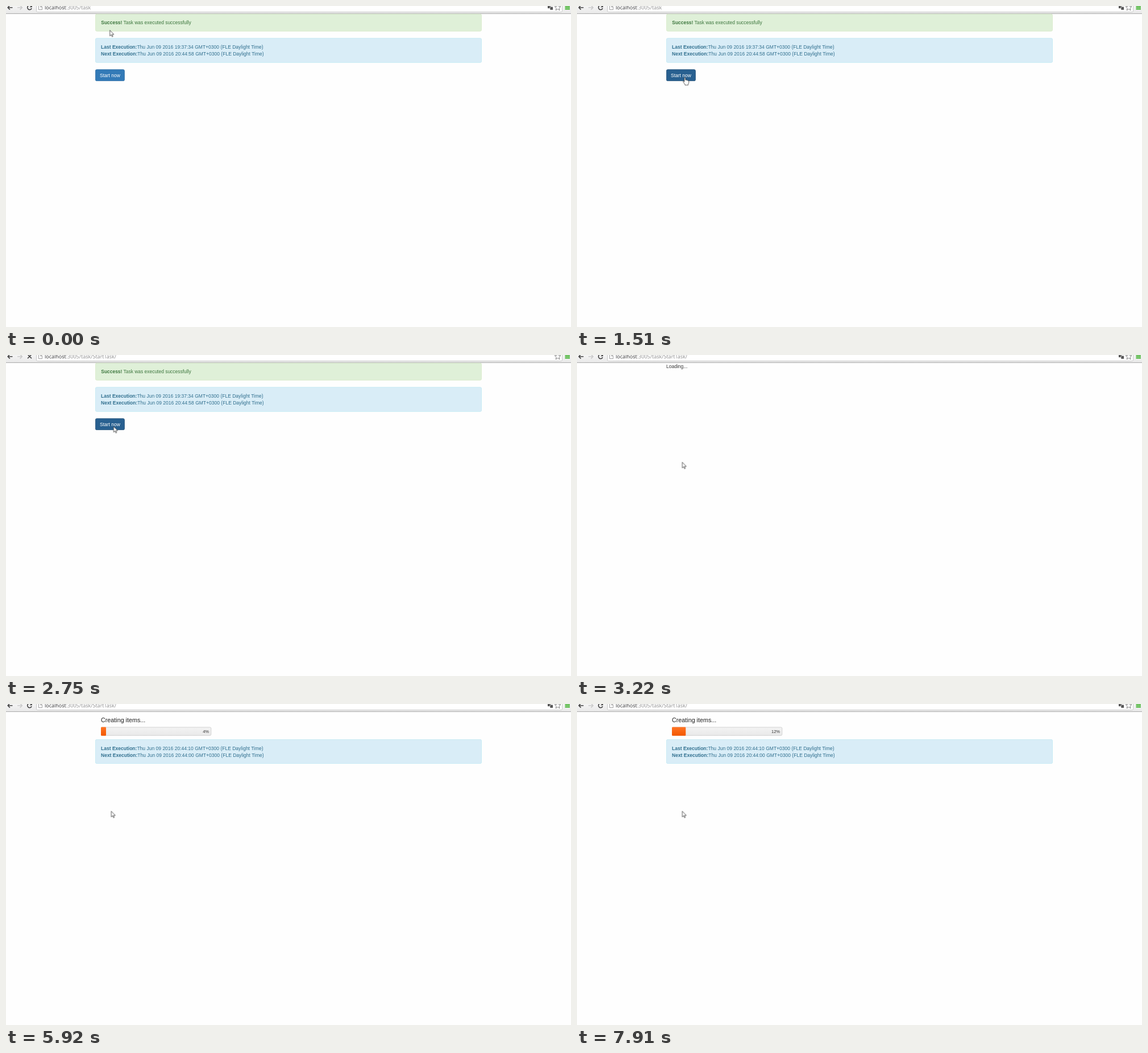
An HTML page that plays this animation: 994 px wide and 564 px high, repeating every 8000 ms.

```html
<!DOCTYPE html>
<html lang="en">
<head>
<meta charset="utf-8">
<title>Task runner</title>
<style>
html, body { margin: 0; width: 100%; height: 100%; overflow: hidden; background: #fefefe; }
svg { display: block; width: 994px; height: 564px; }
text { font: 8.53px "Liberation Sans", Arial, sans-serif; white-space: pre; }
.b { font-weight: bold; }
.url { font: 9px "Open Sans", sans-serif; fill: #8c8c8c; }
.url tspan { fill: #333; }
.ok { font-size: 8.45px; fill: #3c763d; }
.info { fill: #31708f; }
.title { font-size: 10.75px; fill: #222; }
.pct { font-size: 7.5px; fill: #333; text-anchor: end; }

/* Everything changes in hard steps on one shared 8 s clock. */
.t { animation: 8s step-end infinite; }

.first { animation-name: first; }
.loading { animation-name: loading; }
.running { animation-name: running; }
@keyframes first { 0% { opacity: 1 } 40.25% { opacity: 0 } }
@keyframes loading { 0% { opacity: 0 } 40.25% { opacity: 1 } 53% { opacity: 0 } }
@keyframes running { 0% { opacity: 0 } 53% { opacity: 1 } }

.before { animation-name: before; }
.after { animation-name: after; }
.idle { animation-name: idle; }
.busy { animation-name: busy; }
@keyframes before { 0% { opacity: 1 } 34.375% { opacity: 0 } }
@keyframes after { 0% { opacity: 0 } 34.375% { opacity: 1 } }
@keyframes idle { 0% { opacity: 1 } 34.375% { opacity: 0 } 40.25% { opacity: 1 } }
@keyframes busy { 0% { opacity: 0 } 34.375% { opacity: 1 } 40.25% { opacity: 0 } }

.button { animation-name: button; }
@keyframes button {
  0% { fill: #337ab7; stroke: #2e6da4 }
  17% { fill: #286090; stroke: #204d74 }
  32.5% { fill: #204d74; stroke: #1b4668 }
  34.375% { fill: #286090; stroke: #204d74 }
}

.bar { animation-name: bar; }
@keyframes bar {
  0% { width: 0 }
  65.375% { width: 1px }
  67.25% { width: 2px }
  69.125% { width: 4px }
  70.625% { width: 7px }
  72.125% { width: 9px }
  79.75% { width: 11px }
  81.25% { width: 13px }
  83.125% { width: 16px }
  84.625% { width: 17px }
  92% { width: 19px }
  93.5% { width: 21px }
  95.375% { width: 23px }
  97% { width: 24.3px }
}
.p0 { animation-name: p0; }
.p4 { animation-name: p4; }
.p8 { animation-name: p8; }
.p12 { animation-name: p12; }
@keyframes p0 { 0% { opacity: 1 } 74% { opacity: 0 } }
@keyframes p4 { 0% { opacity: 0 } 74% { opacity: 1 } 84.625% { opacity: 0 } }
@keyframes p8 { 0% { opacity: 0 } 84.625% { opacity: 1 } 98.875% { opacity: 0 } }
@keyframes p12 { 0% { opacity: 0 } 98.875% { opacity: 1 } }

.cursor { animation-name: cursor; }
@keyframes cursor {
  0% { transform: translate(182.7px, 42.5px) }
  1.875% { transform: translate(203px, 38px) }
  3.375% { transform: translate(228.5px, 29.5px) }
  5.25% { transform: translate(326.5px, 30px) }
  6.75% { transform: translate(169.5px, 75px) }
  8.25% { transform: translate(304.5px, 82px) }
  9.75% { transform: translate(304.5px, 96.5px) }
  11.625% { transform: translate(304.5px, 119.8px) }
  15.125% { transform: translate(282.5px, 124.5px) }
  17% { transform: translate(190px, 125.5px) }
  18.875% { transform: translate(189.3px, 125.5px) }
  36.375% { transform: translate(189px, 161.5px) }
  38.25% { transform: translate(185.2px, 188.3px) }
}
.arrow { animation-name: arrow; }
.beam { animation-name: beam; }
.hand { animation-name: hand; }
@keyframes arrow {
  0% { opacity: 1 } 3.375% { opacity: 0 } 9.75% { opacity: 1 } 17% { opacity: 0 }
  32.5% { opacity: 1 } 36.375% { opacity: 0 } 40.25% { opacity: 1 }
}
@keyframes beam { 0% { opacity: 0 } 3.375% { opacity: 1 } 9.75% { opacity: 0 } }
@keyframes hand {
  0% { opacity: 0 } 17% { opacity: 1 } 32.5% { opacity: 0 }
  36.375% { opacity: 1 } 40.25% { opacity: 0 }
}
</style>
</head>
<body>
<svg viewBox="0 0 994 564">
  <defs>
    <linearGradient id="chrome" x2="0" y2="1">
      <stop stop-color="#f4f4f4"/><stop offset="1" stop-color="#e9e9e9"/>
    </linearGradient>
    <linearGradient id="track" x2="0" y2="1">
      <stop stop-color="#f3f3f3"/><stop offset="1" stop-color="#e9e9e9"/>
    </linearGradient>
    <linearGradient id="fill" x2="0" y2="1">
      <stop stop-color="#ff7527"/><stop offset="1" stop-color="#f35800"/>
    </linearGradient>
  </defs>
  <rect width="994" height="564" fill="#fefefe"/>

  <!-- Browser toolbar -->
  <rect width="994" height="13" fill="url(#chrome)"/>
  <path d="M0 13.4H994" stroke="#a6a6a6"/>
  <path d="M53.5-2V8.5Q53.5 10.5 55.5 10.5H976.5Q978.5 10.5 978.5 8.5V-2" fill="#fff" stroke="#c9c9c9"/>
  <g fill="none" stroke-width="1.6">
    <path d="M11.5 2.7H3.5M6.8-1L3.2 2.7L6.8 6.4" stroke="#444"/>
    <path d="M20 2.7H28M24.7-1L28.3 2.7L24.7 6.4" stroke="#cbcbcb"/>
    <g class="t idle" stroke="#444">
      <path d="M44.4.2A3.8 3.8 0 1 0 45.1 3.9"/>
      <path d="M45.8-2V2.2H41.6Z" fill="#444" stroke="none"/>
    </g>
    <path class="t busy" d="M38-1L45 6M45-1L38 6" stroke="#444"/>
    <path d="M57.5-1V6.5H63.5V1.5L61-1M60.5-1V1.5H63.5" stroke="#8a8a8a" stroke-width=".8"/>
    <path d="M970.6-3.5L972.2.7L976 1L973 3.7L974 7.6L970.6 5.4L967.2 7.6L968.2 3.7L965.2 1L969 .7Z" fill="#fff" stroke="#777" stroke-width=".9"/>
    <path d="M983.5.4H992M983.5 3H992M983.5 5.6H992" stroke="#27a811" stroke-width="1.5"/>
  </g>
  <g class="t idle">
    <rect x="953" y="-2" width="5.5" height="6" fill="#555"/>
    <rect x="957" y="1.2" width="5.3" height="5.8" fill="#555" stroke="#fff" stroke-width=".6"/>
  </g>
  <text class="url t before" x="68" y="6.2"><tspan>localhost</tspan>:3005/task</text>
  <text class="url t after" x="68" y="6.2"><tspan>localhost</tspan>:3005/task/StartTask/</text>

  <!-- Finished task -->
  <g class="t first">
    <rect x="157.4" y="14.2" width="679.2" height="30" rx="2.4" fill="#dff0d8" stroke="#d6e9c6" stroke-width=".8"/>
    <text class="ok" x="167.3" y="32.3"><tspan class="b">Success!</tspan> Task was executed successfully</text>
    <rect x="157.4" y="56.7" width="679.2" height="42.6" rx="2.4" fill="#d9edf7" stroke="#bce8f1" stroke-width=".8"/>
    <text class="info" x="167" y="75.2"><tspan class="b">Last Execution:</tspan>Thu Jun 09 2016 19:37:34 GMT+0300 (FLE Daylight Time)</text>
    <text class="info" x="167" y="87.2"><tspan class="b">Next Execution:</tspan>Thu Jun 09 2016 20:44:58 GMT+0300 (FLE Daylight Time)</text>
    <rect class="t button" x="157.4" y="111.7" width="51" height="19.9" rx="2.2" stroke-width=".8"/>
    <text x="165" y="124.9" fill="#fff">Start now</text>
  </g>

  <text class="t loading" x="157" y="22.9" fill="#333">Loading...</text>

  <!-- Running task -->
  <g class="t running">
    <text class="title" x="167" y="32.2">Creating items...</text>
    <rect x="167.4" y="40.9" width="193.4" height="14.4" rx="2" fill="url(#track)" stroke="#cacaca" stroke-width=".8"/>
    <rect class="t bar" x="167" y="40.5" width="0" height="15.2" rx="1.3" fill="url(#fill)"/>
    <text class="pct t p0" x="357" y="50.9">0%</text>
    <text class="pct t p4" x="357" y="50.9">4%</text>
    <text class="pct t p8" x="357" y="50.9">8%</text>
    <text class="pct t p12" x="357" y="50.9">12%</text>
    <rect x="157.4" y="62.4" width="679.2" height="42.2" rx="2.4" fill="#d9edf7" stroke="#bce8f1" stroke-width=".8"/>
    <text class="info" x="167" y="80.6"><tspan class="b">Last Execution:</tspan>Thu Jun 09 2016 20:44:10 GMT+0300 (FLE Daylight Time)</text>
    <text class="info" x="167" y="92.6"><tspan class="b">Next Execution:</tspan>Thu Jun 09 2016 20:44:00 GMT+0300 (FLE Daylight Time)</text>
  </g>

  <g class="t cursor">
    <g transform="scale(.62)" fill="#fff" stroke="#222" stroke-width="1.2">
      <path class="t arrow" d="M0 0V16.3L3.8 12.8L6.3 18.5L8.7 17.5L6.3 11.9H11.4Z"/>
      <path class="t beam" d="M-3.5-8H-1.2L0-7L1.2-8H3.5M0-7V7M-3.5 8H-1.2L0 7L1.2 8H3.5" fill="none" stroke-width="1.4"/>
      <path class="t hand" d="M-.8 1.5Q-.5 0 1 0Q2.5 0 2.5 1.5V7Q5 6 6 8Q8.5 7 9 9Q12 8.5 12 11V15L10 19V21.5H1V19.5L-4.5 12.5Q-4.5 10-2.5 10.5L-.8 12.5Z"/>
    </g>
  </g>
</svg>
</body>
</html>
```
